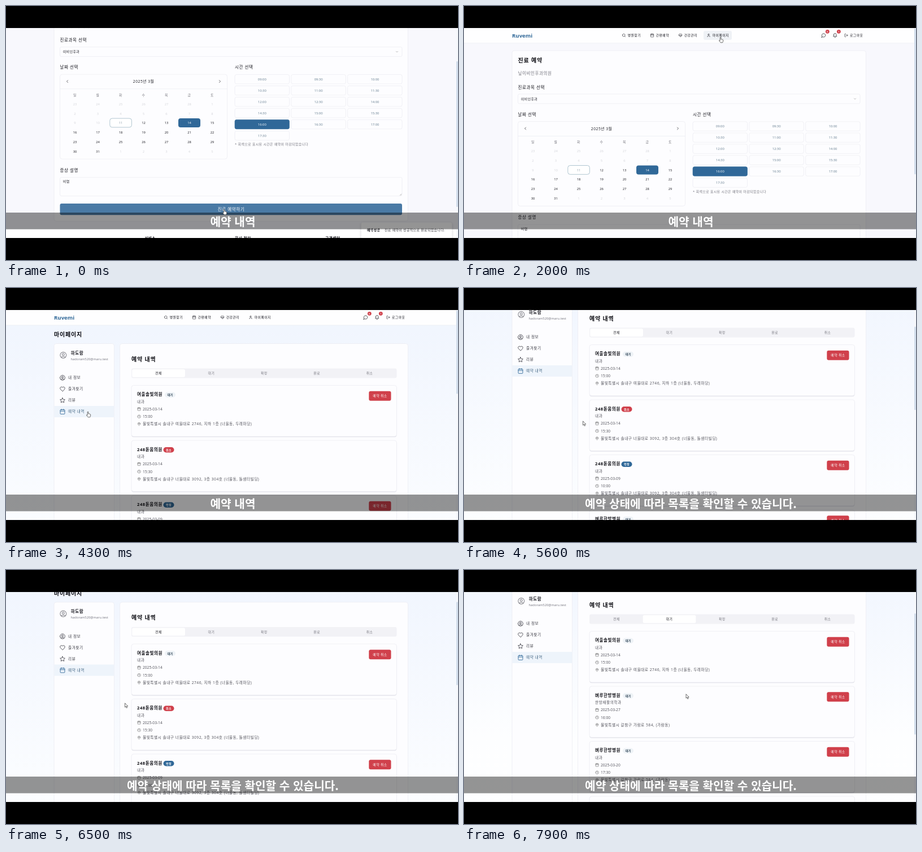
An HTML page that plays this animation: 800 px wide and 450 px high, repeating every 8000 ms.

```html
<!DOCTYPE html>
<html lang="ko">
<head>
<meta charset="utf-8">
<style>
html, body { margin: 0; width: 100%; height: 100%; overflow: hidden; background: #000; }
svg { display: block; width: 100vw; height: 100vh; }
text { font-family: "Open Sans", "Noto Sans", "Noto Sans CJK KR", "Noto Sans CJK", sans-serif; white-space: pre; }
#caption { font: bold 20.2px "Noto Sans CJK KR", "Noto Sans CJK", sans-serif; }
</style>
</head>
<body>
<svg id="stage" viewBox="0 0 800 450"></svg>
<script>
const BLUE = '#306898', RED = '#d0404b', INK = '#18181f', GRAY = '#74747d', LINE = '#e7e8ee', CARD = '#fdfdff';
const TOP = 39, VIEW = 372;
const XS = 5, SM = 5.83, MD = 6.67, LG = 7.5, XL = 10;

// y is the vertical middle of the text
function text(x, y, s, size = SM, fill = INK, weight = 400, anchor = 'start') {
  const gap = /[가-힣]/.test(s) ? size * .08 : 0;
  return `<text x="${x}" y="${y + size * .37}" font-size="${size}" fill="${fill}" font-weight="${weight}"
    text-anchor="${anchor}" letter-spacing="${gap}">${s}</text>`;
}
const mid = (x, y, s, size, fill, weight) => text(x, y, s, size, fill, weight, 'middle');
const box = (x, y, w, h, r, fill, stroke = 'none', extra = '') =>
  `<rect x="${x}" y="${y}" width="${w}" height="${h}" rx="${r}" fill="${fill}" stroke="${stroke}" stroke-width=".6" ${extra}/>`;
const ring = (x, y, r) => `M${x - r} ${y}a${r} ${r} 0 1 0 ${2 * r} 0a${r} ${r} 0 1 0 ${-2 * r} 0`;

const heart = 'M12 21l-8.500-8.500A5.500 5.500 0 0 1 12 5.500a5.500 5.500 0 0 1 8.500 7z';
const icons = {
  search: ring(11, 11, 8) + 'M21 21l-4.300-4.300',
  calendar: 'M5 4h14a2 2 0 0 1 2 2v14a2 2 0 0 1-2 2H5a2 2 0 0 1-2-2V6a2 2 0 0 1 2-2M16 2v4M8 2v4M3 10h18',
  heart,
  pulse: heart + 'M3 13h6l1-2 3 5 2-5 1 2h5',
  user: 'M19 21v-2a4 4 0 0 0-4-4H9a4 4 0 0 0-4 4v2' + ring(12, 7, 4),
  profile: ring(12, 12, 10) + ring(12, 10, 3.5) + 'M6 20v-1a2 2 0 0 1 2-2h8a2 2 0 0 1 2 2v1',
  chat: 'M7.900 20A9 9 0 1 0 4 16.100L2 22Z',
  bell: 'M6 8a6 6 0 0 1 12 0c0 7 3 9 3 9H3s3-2 3-9M10 21a2 2 0 0 0 4 0',
  logout: 'M9 21H5a2 2 0 0 1-2-2V5a2 2 0 0 1 2-2h4M16 17l5-5-5-5M21 12H9',
  star: 'M12 2l3 6.300 7 1-5 4.900 1.200 6.800-6.200-3.200L5.800 21 7 14.200 2 9.300l7-1z',
  clock: ring(12, 12, 10) + 'M12 6v6l4 2',
  pin: 'M20 10c0 6-8 12-8 12s-8-6-8-12a8 8 0 0 1 16 0' + ring(12, 10, 3),
  left: 'M15 18l-6-6 6-6', right: 'M9 18l6-6-6-6', down: 'M6 9l6 6 6-6',
};
const icon = (name, x, y, size = 7, color = INK) =>
  `<path d="${icons[name]}" transform="translate(${x - size / 2} ${y - size / 2}) scale(${size / 24})"
    fill="none" stroke="${color}" stroke-width="2" stroke-linecap="round" stroke-linejoin="round"/>`;

function header() {
  const nav = [['search', '병원찾기'], ['calendar', '간편예약'], ['pulse', '건강관리'], ['user', '마이페이지']];
  const badge = (x, s) => `<circle cx="${x}" cy="45.300" r="3.400" fill="${RED}"/>` + mid(x, 45.3, s, 4.2, '#fff', 600);
  return box(0, TOP, 800, 27, 0, '#fefeff') + box(0, 65.6, 800, .6, 0, LINE) +
    text(85, 52.5, 'Ruvemi', 9.6, BLUE, 700) +
    box(424, 44, 50, 16, 3, '#eff2f6', 'none', 'class="navHover"') +
    nav.map(([i, s], n) => icon(i, 283 + 50 * n, 52) + text(289.7 + 50 * n, 52, s, SM, INK, 500)).join('') +
    icon('chat', 636.5, 52, 8.5) + badge(643.3, '6') + icon('bell', 656.7, 52, 8.5) + badge(663.3, '1') +
    icon('logout', 676.5, 52) + text(683, 52, '로그아웃', SM, INK, 500);
}

function footer(y) {
  return box(0, y, 800, 97, 0, '#fff') + box(0, y, 800, .6, 0, LINE) +
    ['서비스', '회사 정보', '고객센터'].map((s, i) => text(245 + 160 * i, y + 17, s, MD, INK, 700)).join('');
}

function calendar() {
  let out = box(95.5, 204.5, 296, 150, 4, CARD, LINE) + box(95.5, 230, 296, .6, 0, LINE) +
    icon('left', 108.5, 217, 8) + icon('right', 378.5, 217, 8) + mid(243.5, 217.3, '2025년 3월', MD, INK, 500);
  [...'일월화수목금토'].forEach((d, i) => out += mid(122 + 40.5 * i, 241, d, SM, GRAY));
  for (let i = 0; i < 42; i++) {
    const x = 122 + 40.5 * (i % 7), y = 257 + 16.75 * Math.floor(i / 7);
    const n = i - 5, day = n < 1 ? n + 28 : n > 31 ? n - 31 : n;
    let fill = n < 11 || n > 31 ? '#d3d4d9' : INK;
    if (n == 11) { out += box(x - 19.2, y - 8, 38.6, 15.8, 4, '#fff', '#7d9fb2'); fill = '#8798a5'; }
    if (n == 14) { out += box(x - 19.5, y - 8, 39, 16, 4, BLUE); fill = '#fff'; }
    out += mid(x, y, day, SM, fill, n > 11 && n < 32 ? 500 : 400);
  }
  return out;
}

function slots() {
  let out = '';
  for (let i = 0; i < 16; i++) {
    const half = i + (i < 8 ? 18 : 20), on = i == 12;
    const x = 405 + 99.8 * (i % 3), y = 213 + 20 * Math.floor(i / 3);
    const label = String(half >> 1).padStart(2, '0') + (half % 2 ? ':30' : ':00');
    out += box(x, y - 8.2, 96.5, 16.5, 3, on ? BLUE : CARD, on ? BLUE : LINE) + mid(x + 48.3, y, label, SM, on ? '#fff' : '#627b8d');
  }
  return out;
}

function booking() {
  const label = (x, y, s) => text(x, y, s, LG, INK, 500);
  return box(0, TOP, 800, 540, 0, '#f8f8fd') + header() +
    box(85, 79, 626.5, 385.5, 4, CARD, LINE) +
    text(95.5, 96.3, '진료 예약', XL, '#0a0a10', 700) + text(95.5, 119, '닢이비인후과의원', LG, GRAY) +
    label(95.5, 144, '진료과목 선택') + box(95.5, 156, 605.5, 17, 2.5, CARD, LINE) +
    text(101, 164.6, '이비인후과', SM, INK, 500) + icon('down', 692, 164.5, 6, '#777') +
    label(95.5, 192, '날짜 선택') + label(405, 192, '시간 선택') + calendar() + slots() +
    text(405, 328.7, '* 회색으로 표시된 시간은 예약이 마감되었습니다', SM, GRAY) +
    label(95.5, 374.3, '증상 설명') + box(95.5, 387, 605.5, 33, 2.5, CARD, LINE) + text(101, 394.7, '비염') +
    '<path d="M697 419l3-3m-1.500 3l1.500-1.500" stroke="#888" stroke-width=".5"/>' +
    box(95.5, 433.3, 605.5, 20.3, 3, BLUE, 'none', 'id="submit"') + mid(398.5, 443.5, '진료 예약하기', LG, '#fff', 500) +
    footer(478);
}

const road = '물빛특별시 솔내구 ';
const clinics = {
  a: ['여울솔빛의원', road + '여울대로 2746, 지하 1층 (너울동, 두레마당)', 45],
  b: ['248돋움의원', road + '너울대로 3092, 3층 304호 (너울동, 돌샘터빌딩)', 43],
  c: ['벼루한방병원', '물빛특별시 갈참구 가람로 584, (가람동)', 45],
};
const visits = [
  ['a', '대기', '내과', '14', '15:00'], ['b', '취소', '내과', '14', '15:30'], ['b', '확정', '내과', '09', '10:00'],
  ['c', '대기', '한방재활의학과', '27', '16:00'], ['c', '대기', '내과', '20', '17:30'],
  ['c', '대기', '내과', '18', '11:00'], ['b', '취소', '내과', '07', '10:30'],
];

function visit([id, state, dept, day, time], i) {
  const [name, place, w] = clinics[id], y = 172.5 + 97.5 * i, bx = 235 + w + (w > 44 ? 1 : .5);
  const fill = { 대기: '#eff3f7', 취소: RED, 확정: BLUE }[state];
  const row = (dy, i, s) => icon(i, 235.5, y + dy, 6.6, '#555') + text(242, y + dy, s, MD, '#505058');
  return box(222, y + .8, 469.5, 91, 4, '#e3e4ea') + box(222, y, 469.5, 90.5, 4, CARD, LINE) +
    text(232, y + 16.2, name, LG, '#0c0c12', 700) +
    box(bx, y + 12, 19, 9.4, 4.7, fill) + mid(bx + 9.6, y + 16.7, state, XS, state == '대기' ? '#1d3449' : '#fff', 600) +
    text(232, y + 28.7, dept, MD, '#505058') + row(41.8, 'calendar', '2025-03-' + day) + row(55.2, 'clock', time) + row(68.5, 'pin', place) +
    (state == '취소' || i < 0 ? '' : box(642.3, y + 10.3, 39.2, 17, 3, RED) + mid(662, y + 18.8, '예약 취소', SM, '#fff', 500));
}

// tab: -1 profile page, 0 all visits, 1 waiting visits
function myPage(tab) {
  const list = tab ? visits.filter(v => v[1] == '대기') : visits;
  const end = tab < 0 ? 545 : 185 + 97.5 * list.length;
  const menu = [['profile', '내 정보'], ['heart', '즐겨찾기'], ['star', '리뷰'], ['calendar', '예약 내역']];
  const active = tab < 0 ? 0 : 3;
  let out = box(0, TOP, 800, end + 70, 0, 'url(#sky)') + header() + text(85, 82.5, '마이페이지', XL, '#0a0a10', 700) +
    box(85, 98.5, 106.5, end - 98.5, 4, CARD, LINE) + box(201.5, 98.5, 510, end - 98.5, 4, CARD, LINE) +
    icon('profile', 101.3, 119, 13, '#85858c') + text(114.7, 115, '하도람', LG, INK, 700) +
    text(114.5, 125.5, 'hadoram520@maru.test', SM, GRAY) +
    box(85.3, 209, 106, 20, 0, '#f3f5f9', 'none', 'class="sideHover"') +
    box(85.3, 149 + 20 * active, 106, 20, 0, '#eef4fb');
  menu.forEach(([i, s], n) => {
    const on = n == active;
    out += icon(i, 100, 159 + 20 * n, 10.5, on ? BLUE : '#44444c') + text(110, 159 + 20 * n, s, MD, on ? '#4b6c89' : '#3c3c44');
  });
  if (tab < 0) {
    out += text(222, 126, '내 정보', XL, '#0a0a10', 700);
    [['이름', '하도람'], ['이메일', 'hadoram520@maru.test']].forEach(([k, v], i) =>
      out += text(222, 153 + 34 * i, k, SM, INK, 500) + box(222, 160 + 34 * i, 469.5, 17, 2.5, CARD, LINE) + text(227, 168.5 + 34 * i, v, SM, GRAY));
  } else {
    out += text(222, 126, '예약 내역', XL, '#0a0a10', 700) + box(222, 142.5, 469.5, 17, 3, '#f2f2f6') +
      box(223.2 + 93.5 * tab, 144, 93.7, 14, 2.5, '#fff');
    ['전체', '대기', '확정', '완료', '취소'].forEach((s, i) =>
      out += mid(270 + 93.4 * i, 151, s, SM, i == tab ? INK : GRAY, 500));
    out += list.map(visit).join('');
  }
  return out + footer(end + 13);
}

const views = [booking(), myPage(-1), myPage(0), myPage(1)];
const heights = [536, 616, 938, 645];
const $ = id => document.getElementById(id);

$('stage').innerHTML = `
  <defs>
    <clipPath id="screen"><rect y="${TOP}" width="800" height="${VIEW}"/></clipPath>
    <linearGradient id="sky" x2="0" y2="1"><stop stop-color="#f0f5fe"/><stop offset=".5" stop-color="#fdfeff"/><stop offset="1" stop-color="#fff"/></linearGradient>
    <filter id="soft"><feDropShadow dx="0" dy="1.500" stdDeviation="2" flood-opacity=".15"/></filter>
  </defs>
  <rect width="800" height="450"/>
  <g clip-path="url(#screen)">
    <g id="page">${views.map(v => `<g class="view">${v}</g>`).join('')}</g>
    ${box(796.6, TOP, 3.4, VIEW, 0, '#f6f8fc')}
    ${box(797, TOP, 2.8, 10, 1.2, '#d0dceb', 'none', 'id="thumb"')}
    <g id="toast">${box(628.5, 383, 161, 32, 3, '#fff', LINE, 'filter="url(#soft)"')}
      ${text(639, 397, '예약성공', SM, INK, 700)}${text(670, 397, '진료 예약이 성공적으로 완료되었습니다.', SM, '#33333a')}</g>
    <rect y="366" width="800" height="29.500" fill="#000" opacity=".42"/>
    <text id="caption" x="401.500" y="389.500" fill="#fff" text-anchor="middle"></text>
    <g id="cursor" fill="#fff" stroke="#333" stroke-width=".7" stroke-linejoin="round">
      <path id="arrow" d="M-2-4.200v7.300l1.700-1.500 1.200 2.800 1.200-.6-1.200-2.600h2.300z"/>
      <path id="hand" d="M-1.800-4.500q.9-.8 1.600 0v3.300q2.700-.2 3.800 1.200v2.500l-.9 2.300h-3.600l-2.800-3.600q.2-1 1.900.1z"/>
    </g>
  </g>`;

const scrolls = [[600, 83.4], [700, 43.5], [800, 41.7], [900, 22], [1000, 3], [1100, 0],
  [5100, 0], [5200, 18], [5300, 39], [5400, 41.7], [5500, 50], [5600, 72], [5700, 82], [5800, 83.4],
  [6200, 83.4], [6300, 72], [6400, 49], [6500, 41.5], [6700, 41.5], [6800, 12], [6900, 0],
  [7300, 0], [7400, 20], [7500, 39], [7600, 41.7], [7700, 41.7], [7800, 48], [7900, 64]];
const moves = [[0, 387, 365], [500, 396, 281], [1000, 396, 281], [1500, 401, 140], [2000, 455, 60],
  [3100, 455, 60], [4000, 146, 224], [4300, 146, 224], [4900, 212.5, 240], [6600, 212.5, 240],
  [7100, 363, 152], [7200, 363, 152], [7600, 395, 224]];

function at(keys, t) {
  const i = keys.findIndex(k => k[0] > t);
  if (i < 1) return keys.at(i).slice(1);
  const [a, b] = [keys[i - 1], keys[i]], p = (t - a[0]) / (b[0] - a[0]);
  return a.slice(1).map((v, n) => v + (b[n + 1] - v) * p);
}
const show = (el, on) => el.style.display = on ? '' : 'none';

function draw(now) {
  const t = Math.floor(now % 8000 / 100) * 100;
  const view = t < 2700 ? 0 : t < 4100 ? 1 : t < 7200 ? 2 : 3;
  const [scroll] = at(scrolls, t), [x, y] = at(moves, t);
  const onNav = t < 3500 && y < 61 && x > 424, onSide = x < 191 && y > 209, onSubmit = y > 349;
  const onTab = view > 1 && scroll < 1 && x > 222 && y < 160;

  document.querySelectorAll('.view').forEach((el, i) => show(el, i == view));
  document.querySelectorAll('.navHover').forEach(el => show(el, onNav));
  document.querySelectorAll('.sideHover').forEach(el => show(el, onSide));
  $('page').setAttribute('transform', `translate(0 ${-scroll})`);
  $('thumb').setAttribute('y', TOP + 1 + scroll * VIEW / heights[view]);
  $('thumb').setAttribute('height', VIEW * VIEW / heights[view]);
  $('submit').setAttribute('fill', onSubmit ? '#4a7aa5' : BLUE);
  show($('toast'), t < 1400);
  $('caption').textContent = t < 4900 ? '예약 내역' : '예약 상태에 따라 목록을 확인할 수 있습니다.';
  $('cursor').setAttribute('transform', `translate(${x} ${y})`);
  const pointing = onNav || onSide || onSubmit || onTab;
  show($('hand'), pointing);
  show($('arrow'), !pointing);
  requestAnimationFrame(draw);
}
requestAnimationFrame(draw);
</script>
</body>
</html>
```
